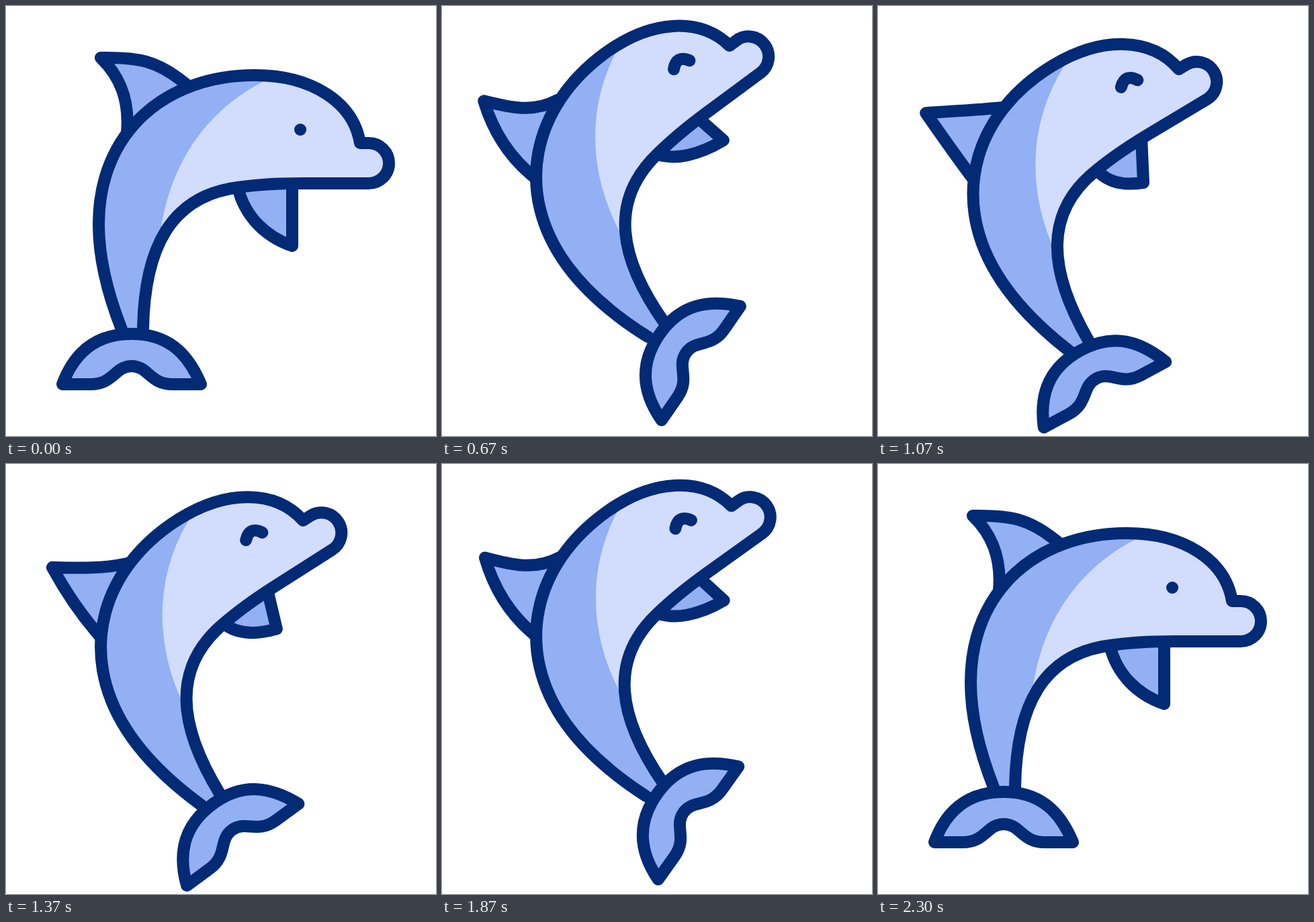
An HTML page that plays this animation: 640x640 px, repeating every 2670 ms.

```html
<!DOCTYPE html>
<html lang="en">
<head>
<meta charset="utf-8">
<title>Dolphin</title>
<style>
  html, body { margin: 0; width: 100%; height: 100%; overflow: hidden; background: #fff; }
  svg { display: block; width: 100%; height: 100%; }
  .line { stroke: #032a75; stroke-width: 18; stroke-linecap: round; stroke-linejoin: round; }
  .mid { fill: #92b0f3; }
  .light { fill: #d2dcfd; }
  .none { fill: none; }
</style>
</head>
<body>
<svg viewBox="0 0 640 640">
  <defs>
    <path id="shape" d="M172 481C150 425 138 375 138 325C138 187 238 103 370 103C455 103 517 143 527 204L540 204A30 30 0 0 1 540 264L440 264C400 264 372 266 345 270C245 283 206 360 204 481"/>
    <clipPath id="inside"><use href="#shape"/></clipPath>
  </defs>
  <g id="dolphin">
    <path id="fin" class="line mid"/>
    <path id="flipper" class="line mid"/>
    <use href="#shape" class="mid"/>
    <path class="light" clip-path="url(#inside)" d="M392 100L392 108C302 150 244 232 230 336L600 345L600 90Z"/>
    <use href="#shape" class="line none"/>
    <path id="eye" class="line none"/>
    <path id="tail" class="line mid" d="M84 563C100 520 130 488 187 488C244 488 272 520 290 563L248 563C214 563 212 536 187 536C162 536 160 563 126 563Z"/>
  </g>
</svg>
<script>
const LOOP = 2670, FRAMES = 80;
const el = id => document.getElementById(id);
const mix = (a, b, t) => a + (b - a) * t;
const mixAll = (a, b, t) => a.map((v, i) => mix(v, b[i], t));

// Smooth value between [frame, value] keys
function track(keys, f) {
  if (f <= keys[0][0]) return keys[0][1];
  for (let i = 1; i < keys.length; i++) {
    const [t0, a] = keys[i - 1], [t1, b] = keys[i];
    if (f < t1) return mix(a, b, (1 - Math.cos(Math.PI * (f - t0) / (t1 - t0))) / 2);
  }
  return keys[keys.length - 1][1];
}

// Two swings between the raised and the lowered pose, then back to rest
const swing = (first, high, low) =>
  [[20.2, first], [28, low], [37, high], [46, low], [55, high]];
const angleKeys = [[0, 0], [10, 10], ...swing(-36.5, -36.1, -27.3), [69, 0]];
const xKeys = [[10, 0], ...swing(76.5, 75.8, 60), [69, 0]];
const yKeys = [[10, 0], ...swing(-56, -54, -8), [69, 0]];
const poseKeys = [[10, 0], [18, 1], [59, 1], [69, 0]];
const swayKeys = swing(0, 0, 1);

const fin = {
  rest: [180,188, 184,140, 170,105, 141,77, 195,76, 225,80, 270,118],
  high: [177,189, 165,144, 168,98, 184,53, 208,82, 231,111, 273,117],
  low: [183,188, 184,151, 177,113, 161,76, 201,85, 241,94, 270,118]
};
const flipper = {
  rest: [345,270, 355,312, 385,343, 426,357, 426,264],
  high: [345,271, 360,292, 392,308, 436,312, 426,265],
  low: [345,270, 343,295, 345,310, 366,329, 426,264]
};
const eye = { open: [438,184, 438,184, 438.1,184], shut: [439.5,183, 455,168, 466,186.5] };

const blend = (part, pose, sway) => mixAll(part.rest, mixAll(part.high, part.low, sway), pose);

function draw(f) {
  const pose = track(poseKeys, f), sway = track(swayKeys, f);
  const a = blend(fin, pose, sway);
  const b = blend(flipper, pose, sway);
  const e = mixAll(eye.open, eye.shut, pose);
  el('fin').setAttribute('d', `M${a.slice(0, 2)}C${a.slice(2)}`);
  el('flipper').setAttribute('d', `M${b.slice(0, 2)}C${b.slice(2, 8)}L${b.slice(8)}`);
  el('eye').setAttribute('d', `M${e.slice(0, 2)}Q${e.slice(2)}`);
  el('tail').setAttribute('transform', `rotate(${pose * mix(-18.9, 17.8, sway)} 187 486)`);
  el('dolphin').setAttribute('transform',
    `translate(${track(xKeys, f)} ${track(yKeys, f)}) rotate(${track(angleKeys, f)} 304 426)`);
}

const start = performance.now();
function tick() {
  const t = (performance.now() - start) % LOOP;
  draw(Math.floor(t * 0.03 + 0.12) % FRAMES);
  requestAnimationFrame(tick);
}
tick();
</script>
</body>
</html>
```
